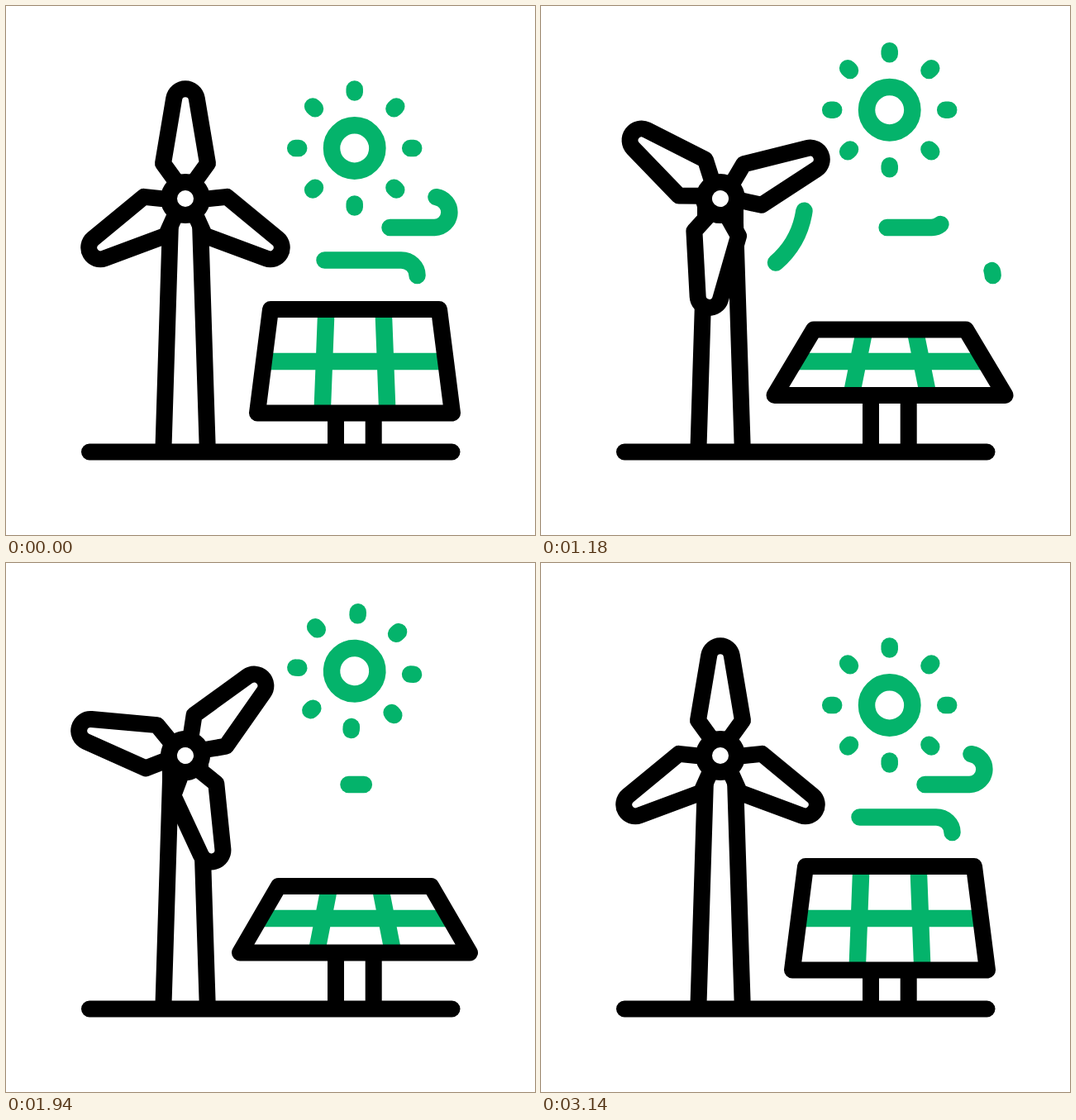
An HTML page that plays this animation: 640x640 px, repeating every 3.6 s.

```html
<!DOCTYPE html>
<html lang="en">
<head>
<meta charset="utf-8">
<title>Wind and solar</title>
<style>
  html, body { margin: 0; width: 100%; height: 100%; overflow: hidden; background: #fff; }
  svg { display: block; width: 100%; height: 100%; }
  .ink, .green { fill: none; stroke: #000; stroke-width: 20; stroke-linecap: round; stroke-linejoin: round; }
  .green { stroke: #04b36b; stroke-width: 20.5; }
  .solid { fill: #fff; }
  .flat { stroke-linecap: butt; }
</style>
</head>
<body>
<svg viewBox="0 0 640 640">
  <defs>
    <path id="blade" class="ink solid" d="M-10 -19 L-27 -42.5 L-13.8 -121 A14 14 0 0 1 13.8 -121 L27 -42.5 L10 -19 Z"/>
  </defs>

  <g id="sun" class="green"><circle r="27.7"/></g>

  <path id="gustTop" class="green" pathLength="1" d="M464.5 268 H518.5 A18.5 18.5 0 0 0 520.5 231.2"/>
  <path id="gustLow" class="green" pathLength="1" d="M385.5 307.5 H478 A19.5 18.5 0 0 1 497.5 326"/>
  <path id="swirl1" class="green" pathLength="1" d="M319.5 233 A102.5 102.5 0 0 1 238.3 333.3"/>
  <path id="swirl2" class="green" pathLength="1" d="M319.5 233 A102.5 102.5 0 0 1 238.3 333.3"/>

  <path class="ink solid flat" d="M190.3 540 L199 262 V240 H235 V262 L243.9 540"/>
  <path class="ink" d="M101 539.5 H539.5"/>
  <g id="rotor">
    <use href="#blade"/>
    <use href="#blade" transform="rotate(120)"/>
    <use href="#blade" transform="rotate(240)"/>
    <circle class="ink solid" r="20"/>
  </g>

  <path id="legs" class="ink flat"/>
  <path id="grid" class="green flat"/>
  <path id="frame" class="ink"/>
</svg>

<script>
const LOOP = 3600;
const $ = id => document.getElementById(id);
const mix = (a, b, k) => a + (b - a) * k;
const clamp = x => Math.min(1, Math.max(0, x));

// smooth 0..1 between two times
const ramp = (t, from, to) => {
  const u = clamp((t - from) / (to - from));
  return u * u * (3 - 2 * u);
};

// cubic-bezier(x1, 0, x2, 1)
function bezier(u, x1, x2) {
  let lo = 0, hi = 1;
  for (let i = 0; i < 30; i++) {
    const s = (lo + hi) / 2, r = 1 - s;
    if (3 * x1 * s * r * r + 3 * x2 * s * s * r + s * s * s < u) lo = s; else hi = s;
  }
  return lo * lo * (3 - 2 * lo);
}

function trim(el, from, to) {
  const len = to - from;
  el.style.display = len > 0.002 ? '' : 'none';
  el.setAttribute('stroke-dasharray', len >= 1 ? 'none' : len + ' 2');
  el.setAttribute('stroke-dashoffset', -from);
}

for (let i = 0; i < 8; i++) {
  const ray = document.createElementNS('http://www.w3.org/2000/svg', 'path');
  ray.setAttribute('d', 'M0 -71.5 V-67.5');
  ray.setAttribute('transform', `rotate(${i * 45})`);
  $('sun').append(ray);
}

// each gust leaves, passes through once more, then returns
const gusts = [
  { el: $('gustTop'), leave: [440, 950], enter: [1010, 1310], exit: [1360, 1690], back: [1860, 2170], mid: 1180 },
  { el: $('gustLow'), leave: [800, 1240], enter: [1250, 1550], exit: [1565, 1893], back: [2250, 2622], mid: 1309 }
];

function drawGust(g, t) {
  let shift, from = 0, to = 1;
  if (t < g.leave[1]) {
    shift = 49 * (t / 1180) ** 2.5;
    from = ramp(t, ...g.leave);
  } else if (t < g.exit[1]) {
    shift = -46 + 0.13 * (t - g.mid);
    from = ramp(t, ...g.exit);
    to = ramp(t, ...g.enter);
  } else {
    shift = -21.5 * (Math.max(0, 3000 - t) / 820) ** 3.3;
    to = ramp(t, ...g.back);
  }
  g.el.setAttribute('transform', `translate(${shift} 0)`);
  trim(g.el, from, to);
}

function drawSwirl(el, t, start) {
  trim(el, ramp(t, start + 154, start + 554), ramp(t, start, start + 400));
}

function drawPanel(k) {
  const top = mix(367, 391.5, k), bottom = mix(492.5, 471, k);
  const tl = mix(320, 330, k), bl = mix(304, 282.5, k);
  const barTop = mix(387.4, 391.5, k), barBottom = mix(382.6, 375.5, k);
  const side = mix(tl, bl, (430 - top) / (bottom - top));
  const flip = x => 844 - x;
  $('frame').setAttribute('d', `M${tl} ${top} H${flip(tl)} L${flip(bl)} ${bottom} H${bl} Z`);
  $('grid').setAttribute('d', `M${side} 430 H${flip(side)} M${barTop} ${top} L${barBottom} ${bottom}` +
    `M${flip(barTop)} ${top} L${flip(barBottom)} ${bottom}`);
  $('legs').setAttribute('d', `M399 ${bottom} V535 M444.7 ${bottom} V535`);
}

function draw(t) {
  const spin = 360 * bezier(clamp(t / 2997), 0.72, 0.374);
  $('rotor').setAttribute('transform', `translate(217 233) rotate(${spin})`);

  const rise = 52 * (ramp(t, 0, 1490) - ramp(t, 1490, 3035));
  const turn = 180 * (ramp(t, 0, 1185) + ramp(t, 1550, 2700));
  $('sun').setAttribute('transform', `translate(421.7 ${172 - rise}) rotate(${turn})`);

  drawPanel(ramp(t, 0, 1120) - ramp(t, 1838, 2980));
  gusts.forEach(g => drawGust(g, t));
  drawSwirl($('swirl1'), t, 946);
  drawSwirl($('swirl2'), t, 1400);
}

const start = performance.now();
function tick() {
  draw((performance.now() - start) % LOOP);
  requestAnimationFrame(tick);
}
tick();
</script>
</body>
</html>
```
